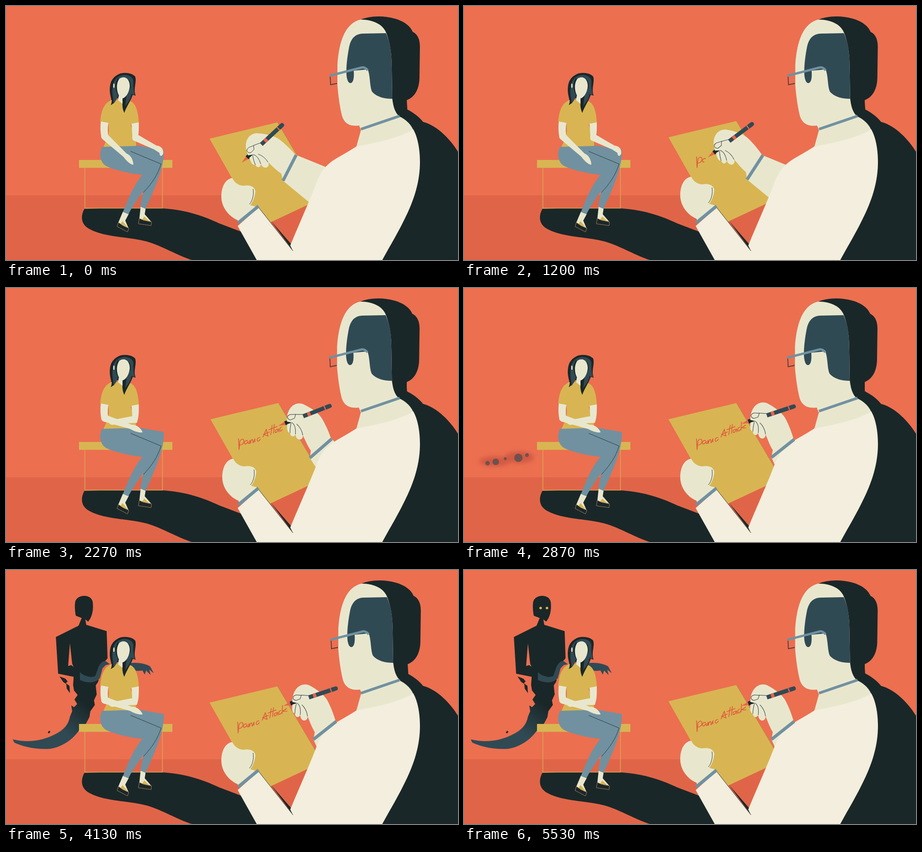
Animation, 997 px wide and 561 px high, one loop 5.59 s. Source, as an HTML page:

```html
<!DOCTYPE html>
<html lang="en">
<head>
<meta charset="utf-8">
<title>Session</title>
<style>
html, body { margin: 0; width: 100%; height: 100%; overflow: hidden; background: #ec6f50; }
svg { display: block; width: 100vw; height: 100vh; }
.dark { fill: #1a2728; }
.navy { fill: #304a54; }
.blue { fill: #7191a0; }
.skin { fill: #e8e7ce; }
.white { fill: #f3eedd; }
.gold { fill: #d8b552; }
.red { fill: #e8644b; }
.band { fill: none; stroke: #7191a0; stroke-width: 7; }
.thin { fill: none; stroke: #26383c; stroke-width: 1; }
.ink path { fill: none; stroke: #e2553f; stroke-width: 1.6; stroke-linecap: round; stroke-linejoin: round; }
</style>
</head>
<body>
<svg viewBox="0 0 997 561" preserveAspectRatio="none">
  <defs>
    <linearGradient id="tailFill" gradientUnits="userSpaceOnUse" x1="180" y1="300" x2="130" y2="362">
      <stop offset="0" stop-color="#1a2728"/><stop offset="1" stop-color="#304a54"/>
    </linearGradient>
    <filter id="soft" x="-50%" y="-100%" width="200%" height="300%"><feGaussianBlur stdDeviation="5"/></filter>
    <mask id="reveal" maskUnits="userSpaceOnUse" x="0" y="0" width="400" height="450">
      <g id="blobs" fill="#fff"></g>
      <g id="brush" fill="none" stroke="#fff"></g>
    </mask>
  </defs>

  <rect width="997" height="561" fill="#ec6f50"/>
  <rect y="418" width="997" height="143" fill="#e06548"/>
  <path class="dark" d="M173,448 Q260,445 345,447 C400,450 440,466 470,480 L520,499 L600,561 H410 C380,552 345,530 310,520 C270,510 215,510 185,493 C162,482 166,460 173,448Z"/>
  <path class="dark" d="M584,474 L629,526 L634,542Z"/>

  <g id="glow" filter="url(#soft)" fill="#d05a42">
    <ellipse cx="68" cy="383" rx="34" ry="11"/><ellipse cx="122" cy="374" rx="32" ry="13"/>
  </g>

  <g id="ghost" mask="url(#reveal)">
    <path fill="url(#tailFill)" d="M150,225 L205,215 L204,245 L198,255 L200,275 L194,288 L196,298 L186,312 L184,325 L176,340 L166,346 C152,372 125,391 97,395 C62,397 35,389 18,381 L15,374 C50,383 82,376 108,363 C126,354 138,342 141,324 L146,312 L144,299 L150,303 L157,296 L151,286 L158,276 L150,266 L148,254Z"/>
    <path class="dark" d="M118,235 L131,240 L136,246 L132,250 L140,256 L141,272 L134,262 L133,252 L126,247Z M95,355 l3,2 l-3,4 l-3,-2Z"/>
    <path class="dark" d="M110,148 L160,123 L167,106 L154,101 C152,92 151,76 153,69 C158,54 186,52 191,69 C194,89 189,106 181,114 L175,109 L177,121 L222,135 L224,195 L206,216 L202,250 L152,250 L150,236 L115,229Z"/>
    <path fill="#ec6f50" d="M141,162 L146,207 L149,214 L144,210 L137,212Z"/>
    <path class="navy" d="M163,226 C176,237 190,238 197,234 L204,214 C209,204 215,199 221,202 L229,208 L220,210 L213,217 L207,239 C196,252 176,249 163,243Z"/>
    <path class="navy" d="M270,206 C290,203 309,207 318,213 L326,228 L316,220 L319,232 L309,222 L306,231 L301,222 C290,224 280,222 270,218Z"/>
    <g id="eyes"><ellipse cx="169" cy="84"/><ellipse cx="183" cy="84"/></g>
  </g>

  <!-- bench -->
  <rect class="gold" x="161" y="340" width="206" height="17.5"/>
  <path d="M174,357V446.500H345V357" fill="none" stroke="#d8a552" stroke-width="1.600"/>

  <!-- sitting woman -->
  <path class="skin" d="M258,454 L271,459 L263,474 L270,490 L247,480Z M297,443 L308,447 L306,460 L320,476 L294,471Z"/>
  <path class="gold" d="M257,475 L268,488 L252,482Z M305,465 L316,475 L300,472Z"/>
  <path class="dark" stroke="#c9936a" stroke-width=".8" d="M248,478 L258,485 L271,491 L268,499 L245,487Z M294,469 L303,473 L321,477 L320,485 L292,481Z"/>
  <path class="blue" d="M212,311 L290,308 L348,318 C349,335 345,355 338,375 C330,400 318,425 308,448 L296,443 L303,407 C292,425 280,440 270,460 L258,455 C270,425 282,395 301,373 C270,370 240,362 222,354 C206,345 205,325 212,311Z"/>
  <path class="thin" d="M275,321 L342,349 C335,372 322,392 303,412"/>
  <path class="dark" d="M246,152 C256,145 278,147 285,156 C289,168 280,182 286,198 L278,196 L262,214 L246,203 C240,207 238,218 231,219 C236,208 228,200 229,182 C230,165 236,158 246,152Z"/>
  <path class="gold" d="M232,208 C218,214 210,228 208,255 L226,258 L227,275 C226,290 220,300 215,311 L287,309 C288,290 278,275 275,262 L293,258 C292,235 287,215 274,210 L262,212 L247,207Z"/>
  <path class="dark" d="M234,180 L247,192 C246,206 240,214 231,219 C236,208 231,200 234,180Z M274,180 L282,184 C280,205 268,216 261,236 C255,224 257,212 257,204Z"/>
  <path class="navy" d="M250,155 C240,165 239,185 247,196 C245,206 241,211 237,216 C238,205 233,196 235,182 C236,168 242,158 250,155Z M248,156 C262,148 280,154 281,166 C280,182 283,190 284,197 L277,194 C274,210 267,214 263,222 L266,196 L275,180 C275,172 274,168 272,164 L248,162Z"/>
  <path class="skin" d="M251,160 C263,153 273,162 273,177 C272,191 264,203 257,204 L257,216 L247,208 L249,197 C243,187 243,168 251,160Z"/>
  <ellipse class="skin" cx="238" cy="176" rx="1.500" ry="5"/>
  <path class="skin" d="M277,260 L293,257 C293,272 293,284 290,293 L279,293 Z"/>
  <path id="armR" class="skin" d="M-4,-7 C10,-7 30,-6 52,-6 C62,-10 70,-7 74,2 C76,10 70,12 66,5 L52,4 L0,9 C-6,7 -8,0 -4,-7Z"/>
  <path class="skin" d="M209,255 L226,258 C224,268 224,278 226,290 L211,292 C208,280 208,268 209,255Z"/>
  <path id="armL" class="skin" d="M-5,-8 L10,-7 L62,-5 C72,-9 84,-4 90,3 C86,7 72,7 62,5 L4,8 C-6,9 -10,0 -5,-8Z"/>

  <!-- notepad -->
  <g id="pad">
    <path class="gold" d="M451,290 L601,254 L699,420 L668,436 L585,475 L562,486Z"/>
    <path d="M601,254 L690,405" fill="none" stroke="#b98148"/>
    <g id="ink" class="ink"></g>
    <path class="skin" d="M513,470 C494,462 477,442 477,418 C477,396 486,379 501,377 C506,387 515,394 526,394 C541,391 551,397 552,406 C551,420 545,432 541,437 L556,441 L514,474Z"/>
    <path class="thin" d="M547,401 C549,414 546,427 539,435"/>
  </g>

  <!-- therapist -->
  <path class="dark" d="M862,205 H884 V228 C900,236 912,246 920,256 C952,264 982,297 997,322 V561 H800Z"/>
  <g id="head">
    <path class="dark" d="M780,31 C800,22 830,20 858,28 C882,35 893,47 897,57 C908,62 913,74 913,90 L912,160 C911,186 900,202 884,208 L886,240 L850,245 L820,120Z"/>
    <path class="skin" d="M782,30 C752,37 735,70 731,130 L731,175 C733,200 736,220 740,238 C744,258 757,267 779,264 L783,274 L868,244 C858,236 854,222 852,204 L851,140 C851,100 846,80 840,63 C834,42 812,30 782,30Z"/>
    <path class="navy" d="M838,60 L786,61 C768,62 760,75 757,90 C752,115 749,145 752,159 C754,168 757,171 761,170 C767,168 768,156 767,143 L798,140 C804,155 802,180 808,190 C818,201 835,205 852,205 L851,140 C851,100 847,80 838,60Z"/>
    <path fill="none" stroke="#4e3a3a" stroke-width="1.800" d="M715,153 L716,174 L730,171"/>
    <path class="band" style="stroke-width:5" d="M714,154 L784,136 Q791,134 798,142"/>
  </g>
  <path id="sleeve" class="skin"/>
  <path class="white" d="M773,310 C755,322 740,330 728,337 C705,351 694,366 685,390 C670,430 642,492 627,529 L633,541 L557,445 L511,486 L553,561 H830 C848,528 862,505 874,481 C897,437 912,395 913,350 C914,312 906,285 898,272Z"/>
  <path class="skin" d="M783,274 L868,244 C881,250 893,261 898,273 C870,290 820,302 773,310Z"/>
  <path class="band" style="stroke-width:6" d="M783,272 L868,243"/>
  <path class="thin" d="M558,446 L633,541"/>
  <path class="band" d="M512,479 L557,442"/>

  <!-- writing hand, placed by its pen tip -->
  <g id="hand">
    <g transform="rotate(-43)">
      <path class="red" d="M0,0 L17,-4 V4Z"/>
      <rect class="dark" x="16" y="-4.500" width="26" height="9"/>
    </g>
    <g transform="translate(-520 -346)">
      <path class="skin" d="M530,318 C526,298 535,283 552,281 C572,282 590,286 602,294 C618,306 630,319 638,328 L610,382 L607,370 C595,362 586,352 578,345 C582,352 577,358 571,357 C567,356 564,353 562,349 C562,357 554,359 550,351 C544,352 540,346 537,335 L545,328 L534,330Z"/>
      <path class="thin" d="M531,319 C534,310 540,312 546,308 L547,317 L540,324 Q533,325 531,319 M546,308 L562,302 M545,328 Q556,330 562,349 M556,327 Q570,332 578,345 M544,330 Q546,342 550,351"/>
    </g>
    <g transform="rotate(-43)">
      <rect class="navy" x="59" y="-4.500" width="61" height="9"/>
      <rect class="navy" x="108" y="-4.500" width="18" height="9" rx="4"/>
      <rect class="red" x="69" y="-4.500" width="7" height="9"/>
      <rect class="red" x="109" y="-4.500" width="2.500" height="9"/>
    </g>
    <path class="band" d="M120,-17 L91,40"/>
  </g>
</svg>
<script>
const LOOP = 5590, STEP = 200 / 3;
const $ = id => document.getElementById(id);
const clamp = v => Math.max(0, Math.min(1, v));
const part = (t, a, b) => clamp((t - a) / (b - a));
const ease = p => p * p * (3 - 2 * p);
const lerp = (a, b, p) => a + (b - a) * p;

function make(parent, tag, attrs) {
  const el = document.createElementNS('http://www.w3.org/2000/svg', tag);
  for (const k in attrs) el.setAttribute(k, attrs[k]);
  return parent.appendChild(el);
}

// Rows are [time, value, value, ...]
function track(rows, t) {
  let i = 0;
  while (i < rows.length - 2 && t >= rows[i + 1][0]) i++;
  const [a, b] = [rows[i], rows[i + 1]];
  const p = part(t, a[0], b[0]);
  return a.slice(1).map((v, k) => lerp(v, b[k + 1], p));
}

const penPath = [
  [0, 520, 346, 0], [650, 520, 346, 0], [1200, 538, 334, 6],
  [1730, 567, 318, 13.5], [2450, 612, 300, 24.6], [LOOP, 612, 300, 24.6]
];
// pad x, pad y, head x
const sway = [
  [0, -2, 3, 0], [600, 0, 0, 0], [1730, 0, 0, -.5], [2870, 0, 0, -1],
  [3530, -2, 3, 2], [4730, -2, 3, 2], [5530, 0, 0, -.5], [LOOP, 0, 0, -.5]
];

// Pen strokes: [path, start, end]
const strokes = [
  ['M513,333 L514,357 L516,338 Q522,330 525,337 Q525,345 517,347', 750, 1080],
  ['M533,337 Q526,336 526,343 Q528,348 534,339 Q533,345 537,343', 1080, 1310],
  ['M537,343 L538,336 L539,343 Q541,333 544,335 L545,342', 1310, 1410],
  ['M546,341 L549,333 L549,340', 1410, 1480],
  ['M560,330 Q553,331 554,337 Q556,341 561,334', 1480, 1590],
  ['M567,329 L574,312 L578,327 L568,323 L581,318', 1590, 1790],
  ['M587,303 L584,324', 1800, 1880],
  ['M592,301 L590,321', 1890, 1970],
  ['M580,313 L598,306', 1970, 2040],
  ['M599,312 Q592,313 594,319 Q597,321 601,311 L602,318', 2040, 2170],
  ['M608,307 Q603,309 604,315 Q606,318 610,312', 2170, 2270],
  ['M612,296 L611,314', 2270, 2340],
  ['M621,303 L612,309 L622,309', 2340, 2450]
].map(([d, a, b]) => ({ a, b, el: make($('ink'), 'path', { d, pathLength: 1 }) }));

// Spreading spots: [x, y, start, end, radius]
const blobs = [
  [52, 387, 2700, 3250, 55], [70, 384, 2700, 3250, 80], [91, 377, 2700, 3250, 35],
  [120, 375, 2700, 3250, 100], [139, 369, 2700, 3250, 45], [22, 378, 2850, 3250, 30],
  [160, 325, 2950, 3350, 55], [168, 280, 3050, 3420, 55], [165, 250, 3100, 3450, 36],
  [125, 245, 3200, 3450, 22], [212, 222, 3200, 3500, 24], [298, 217, 3200, 3500, 40]
].map(([cx, cy, a, b, r]) => ({ a, b, r, el: make($('blobs'), 'circle', { cx, cy }) }));

// Leaning, wavy brush marks that climb the torso
const marks = [126, 148, 169, 189, 206, 222].map((x, i) => {
  let d = `M${x},232`;
  for (let y = 204, k = i; y >= 36; y -= 28, k++) d += ` q${k % 2 ? 3 : -6},-14 -2,-28`;
  return make($('brush'), 'path', { d, pathLength: 1 });
});

function draw(el, p) {
  el.setAttribute('stroke-dasharray', `${p} 2`);
  el.style.visibility = p > 0 ? 'visible' : 'hidden';
}
const place = (id, x, y, r = 0, s = 1) =>
  $(id).setAttribute('transform', `translate(${x} ${y}) rotate(${r}) scale(${s} 1)`);

function drawHand(t) {
  const [x, y, r] = track(penPath, t);
  place('hand', x, y, r);
  const c = Math.cos(r * Math.PI / 180), s = Math.sin(r * Math.PI / 180);
  const at = (u, v) => `${x + u * c - v * s},${y + u * s + v * c}`;
  const q = r / 24.6;
  $('sleeve').setAttribute('d',
    `M${at(120, -17)} L${lerp(704, 728, q)},${lerp(355, 338, q)} L700,400 L${lerp(668, 686, q)},${lerp(433, 392, q)} L${at(91, 40)}Z`);
}

function drawArms(t) {
  const l = ease(part(t, 1300, 1800)), r = ease(part(t, 1340, 2020));
  place('armL', 217, 287, lerp(43, 18.5, l));
  place('armR', 285, lerp(289, 291, r), lerp(29, 176, r), lerp(.97, .82, r));
}

function drawGhost(t) {
  $('ghost').setAttribute('opacity', lerp(.6, 1, part(t, 2870, 3080)));
  $('glow').setAttribute('opacity', part(t, 2600, 2800) * (1 - part(t, 3000, 3250)));
  for (const b of blobs) b.el.setAttribute('r', b.r * part(t, b.a, b.b) ** 2);
  const rise = part(t, 3230, 3760);
  $('brush').setAttribute('stroke-width', lerp(13, 40, part(t, 3540, 3950)));
  marks.forEach(m => draw(m, rise));
  const open = part(t, 4720, 4930);
  for (const e of $('eyes').children) {
    e.setAttribute('rx', 2.8);
    e.setAttribute('ry', lerp(.7, 2.8, open));
    e.setAttribute('cy', lerp(82, 84, open));
    e.setAttribute('fill', open < .2 ? '#cfcdb8' : '#d8b552');
  }
  $('eyes').setAttribute('opacity', t < 4600 ? 0 : 1);
}

function render(now) {
  const t = Math.floor((now % LOOP + 4) / STEP) * STEP;
  const [px, py, hx] = track(sway, t);
  place('pad', px, py);
  place('head', hx, 0);
  for (const s of strokes) draw(s.el, part(t, s.a, s.b));
  drawHand(t);
  drawArms(t);
  drawGhost(t);
}

const begin = performance.now();
function tick() {
  render(performance.now() - begin);
  requestAnimationFrame(tick);
}
tick();
</script>
</body>
</html>
```
